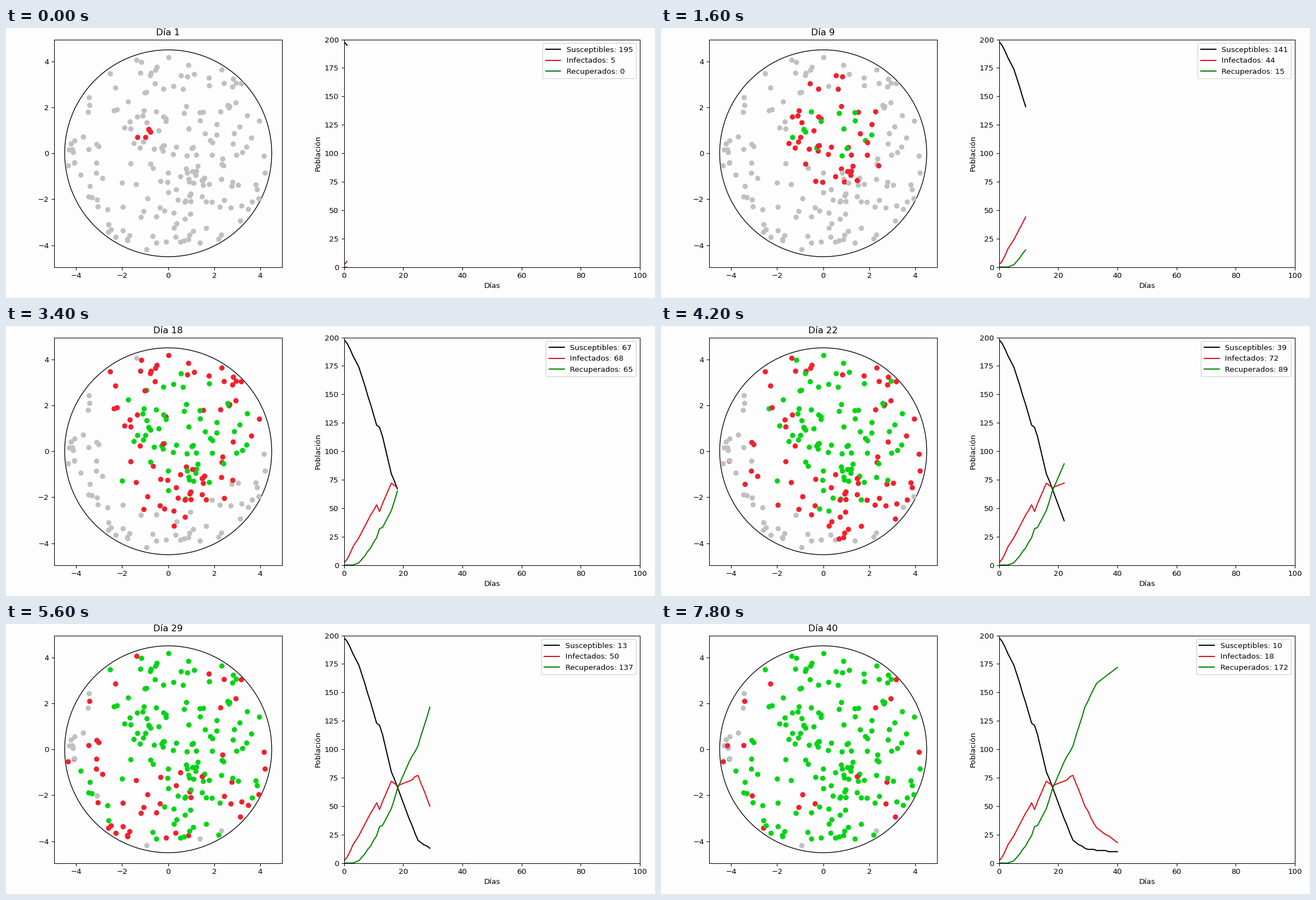
These frames come from a looping animation (1159x483 px, 8000 ms). A matplotlib script:

```python
import numpy as np
import matplotlib.pyplot as plt
from matplotlib.animation import FuncAnimation

W, H = 1159, 483
DPI = W / 12
PEOPLE, RADIUS, DAYS = 200, 4.5, 40
PAPER = "#fdfdfd"
DOT_COLORS = np.array(["#c0c0c0", "#f2202c", "#00d415"])

# Turning points of the epidemic: day, healthy, cured
TURNS = [(0, 198, 0), (1, 195, 0), (3, 184, 0), (5, 174, 2), (9, 141, 15),
         (11, 123, 24), (12, 121, 32), (13, 113, 33), (16, 80, 48),
         (18, 67, 65), (22, 39, 89), (25, 20, 103), (29, 13, 137),
         (33, 11, 158), (40, 10, 172)]
OUTBREAK = [(-1.33, .69), (-.98, .69), (-.83, 1.01), (-.84, 1.04), (-.76, .92)]
CENTRE = np.array([0.5, 0.9])
SHELTER = np.array([-3.7, 1.2])

rng = np.random.default_rng(12)


def totals():
    """Healthy, ill and cured people per day."""
    days, healthy, cured = zip(*TURNS)
    t = np.arange(DAYS + 1)
    healthy = np.rint(np.interp(t, days, healthy)).astype(int)
    cured = np.rint(np.interp(t, days, cured)).astype(int)
    return healthy, PEOPLE - healthy - cured, cured


def settle():
    """The outbreak group, and everybody else evenly over the disc."""
    n = PEOPLE - len(OUTBREAK)
    r = 4.42 * np.sqrt(rng.random(n))
    a = rng.uniform(0, 2 * np.pi, n)
    crowd = np.column_stack([r * np.cos(a), r * np.sin(a)])
    return np.vstack([OUTBREAK, crowd])


def distance(pos, point):
    return np.hypot(*(pos - point).T)


def spread(pos):
    """State of everybody per day: 0 healthy, 1 ill, 2 cured."""
    # The illness moves outwards and reaches the shelter last
    delay = distance(pos, CENTRE) + rng.normal(0, 0.35, PEOPLE)
    delay += 3 * np.exp(-distance(pos, SHELTER) ** 2)
    delay[:len(OUTBREAK)] = -9
    rank = np.argsort(np.argsort(delay))
    caught = np.searchsorted(PEOPLE - healthy, rank, side="right")
    heal = caught + rng.exponential(8, PEOPLE)

    state = np.zeros(PEOPLE, int)
    history = []
    for day in range(DAYS + 1):
        state[(caught <= day) & (state == 0)] = 1
        sick = np.flatnonzero(state == 1)
        count = cured[day] - np.count_nonzero(state == 2)
        state[sick[np.argsort(heal[sick])[:count]]] = 2
        history.append(state.copy())
    return history


def axes_px(left, top, right, bottom):
    ax = fig.add_axes([left / W, 1 - bottom / H,
                       (right - left) / W, (bottom - top) / H])
    ax.set_facecolor(PAPER)
    return ax


plt.rcParams["font.family"] = "DejaVu Sans"
# The small surplus keeps the pixel size from rounding down
fig = plt.figure(figsize=((W + 0.01) / DPI, (H + 0.01) / DPI), dpi=DPI,
                 facecolor=PAPER)

healthy, ill, cured = totals()
pos = settle()
history = spread(pos)

town = axes_px(86.3, 20.6, 493, 427.6)
town.set(xlim=(-4.95, 4.95), ylim=(-4.95, 4.95))
town.set_xticks(range(-4, 5, 2))
town.set_yticks(range(-4, 5, 2))
town.add_patch(plt.Circle((0, 0), RADIUS, fill=False, ec="black", lw=1))
dots = town.scatter(*pos.T, s=36, lw=1, zorder=2)

chart = axes_px(603.7, 20.6, 1132, 427.6)
chart.set(xlim=(0, 100), ylim=(0, 200), xlabel="Días", ylabel="Población")
chart.set_yticks(range(0, 201, 25))
series = [("Susceptibles", healthy, "black"),
          ("Infectados", ill, "#e00c1c"),
          ("Recuperados", cured, "green")]
lines = [chart.plot([], [], color=c)[0] for _, _, c in series]


def update(i):
    day = i + 1
    town.set_title(f"Día {day}")
    dots.set_color(DOT_COLORS[history[day]])
    for line, (name, data, _) in zip(lines, series):
        line.set_data(np.arange(day + 1), data[:day + 1])
        line.set_label(f"{name}: {data[day]}")
    chart.legend(loc="upper right")
    return [dots, *lines]


anim = FuncAnimation(fig, update, frames=DAYS, interval=200, repeat=True,
                     repeat_delay=0, blit=False)
plt.show()
```
